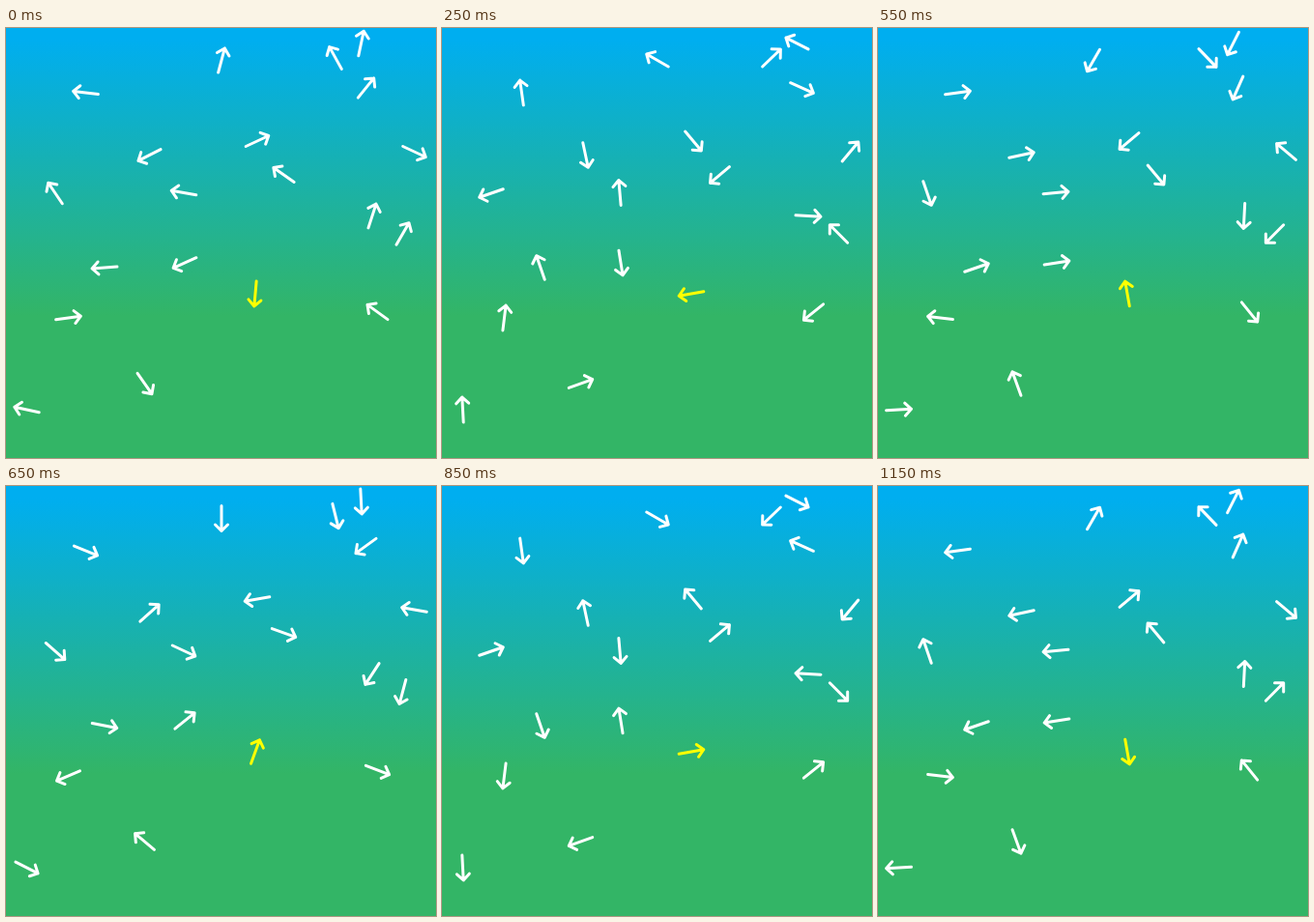
An HTML page for the animation above (1.2 s loop, 445x445 px).

```html
<!DOCTYPE html>
<html lang="en">
<head>
<meta charset="utf-8">
<title>Spinning arrows</title>
<style>
  html, body { margin: 0; width: 100%; height: 100%; overflow: hidden; }
  svg { display: block; width: 100%; height: 100%; }
  #arrows { fill: none; stroke: #fff; stroke-width: 3; stroke-linecap: round; stroke-linejoin: round; }
</style>
</head>
<body>
<svg viewBox="0 0 445 445">
  <defs>
    <linearGradient id="sky" gradientUnits="userSpaceOnUse" x1="0" y1="12" x2="0" y2="298">
      <stop offset="0" stop-color="#00aef0"/>
      <stop offset="1" stop-color="#33b566"/>
    </linearGradient>
  </defs>
  <rect width="445" height="445" fill="url(#sky)"/>
  <g id="arrows"></g>
</svg>
<script>
  const LOOP = 1200;
  const STEPS = 24;
  const arrows = [];

  function addArrow(spin, x, y, angle, color) {
    const path = document.createElementNS("http://www.w3.org/2000/svg", "path");
    path.setAttribute("d", "M-13 0H13M6.5 -6.5L13 0L6.5 6.5");
    if (color) path.setAttribute("stroke", color);
    document.getElementById("arrows").append(path);
    arrows.push({ path, spin, x, y, angle });
  }

  // each arrow: centre x, centre y, starting angle
  const clockwise = [
    [82.5, 67, 187], [341, 31, 241], [372.5, 62, 309],
    [260, 117, 335], [184, 170.5, 190], [379, 194.5, 288],
    [102, 248, 176], [21.5, 395, 192], [258, 275, 95, "#ff0"]
  ];
  const counterclockwise = [
    [223, 33.5, 285], [367.5, 16, 282], [422.5, 128, 25],
    [148.5, 131.5, 153], [287.5, 152, 215], [51, 171, 236],
    [410.5, 213, 300], [185, 243, 156], [64.5, 300, 352],
    [384.5, 294, 216], [143.5, 368, 55]
  ];
  clockwise.forEach(a => addArrow(1, ...a));
  counterclockwise.forEach(a => addArrow(-1, ...a));

  // every arrow makes one full turn per loop, in hard steps
  function draw(time) {
    const turn = Math.floor(time % LOOP / LOOP * STEPS) * 360 / STEPS;
    for (const { path, spin, x, y, angle } of arrows) {
      path.setAttribute("transform", `translate(${x} ${y}) rotate(${angle + spin * turn})`);
    }
  }

  let start;
  function frame(now) {
    start ??= now;
    draw(Math.max(0, now - start));
    requestAnimationFrame(frame);
  }
  draw(0);
  requestAnimationFrame(frame);
</script>
</body>
</html>
```
